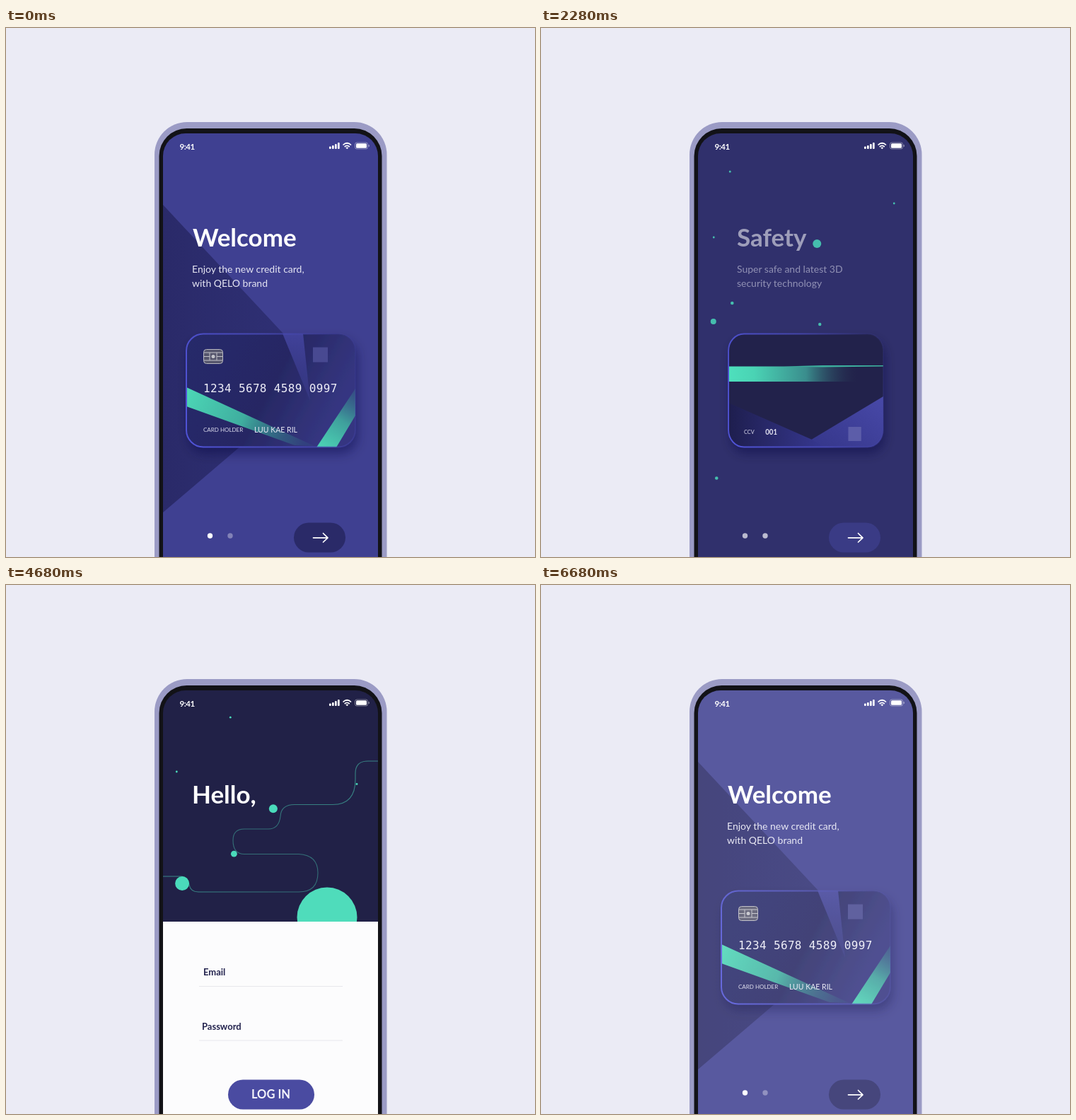
Animation of 748x748 px, one loop 6720 ms. Source, as an HTML page:

```html
<!DOCTYPE html>
<html lang="en">
<head>
<meta charset="utf-8">
<title>Card onboarding</title>
<style>
  html, body { margin: 0; width: 100%; height: 100%; overflow: hidden; background: #ebebf5; }
  svg { display: block; width: 100vw; height: 100vh; font-family: Lato, sans-serif; }
  .title { font-size: 35px; font-weight: 700; fill: #fff; }
  .sub { font-size: 14px; fill: #e4e4f2; }
  .tiny { font-size: 8px; fill: #dcdcee; }
  .label { font-size: 13px; font-weight: 700; fill: #23234e; }
  .number { font: 16px "DejaVu Sans Mono", monospace; letter-spacing: .35px; fill: #eeeef8; }
  .wire { fill: none; stroke-width: 1.1; }
</style>
</head>
<body>
<svg viewBox="0 0 748 748">
  <defs>
    <clipPath id="screen"><rect x="222" y="149" width="304" height="700" rx="32"/></clipPath>
    <clipPath id="cardShape"><rect x="255" y="432.5" width="239" height="160" rx="24"/></clipPath>
    <filter id="shadow" x="-20%" y="-20%" width="140%" height="150%">
      <feDropShadow dx="3" dy="9" stdDeviation="8" flood-color="#11113a" flood-opacity=".42"/>
    </filter>
    <linearGradient id="shade" x1="0" x2="1">
      <stop stop-color="#2a2a69"/><stop offset="1" stop-color="#303177"/>
    </linearGradient>
    <linearGradient id="front" x1="0" x2="1" y2=".35">
      <stop stop-color="#28296a"/><stop offset=".6" stop-color="#272864"/><stop offset="1" stop-color="#353681"/>
    </linearGradient>
    <linearGradient id="wedge" x1="0" y1="0" x2="0" y2="1">
      <stop stop-color="#41429a"/><stop offset="1" stop-color="#41429a" stop-opacity=".3"/>
    </linearGradient>
    <linearGradient id="edge" x1="0" y1=".6" x2="1" y2=".4">
      <stop stop-color="#5053d6"/><stop offset=".55" stop-color="#4a4cbc" stop-opacity=".8"/>
      <stop offset="1" stop-color="#4a4cbc" stop-opacity=".12"/>
    </linearGradient>
    <linearGradient id="ribbonA" gradientUnits="userSpaceOnUse" x1="255" y1="515" x2="436" y2="590">
      <stop stop-color="#4cd6b6"/><stop offset=".45" stop-color="#3fae9f"/>
      <stop offset="1" stop-color="#2f6a83" stop-opacity=".1"/>
    </linearGradient>
    <linearGradient id="ribbonB" gradientUnits="userSpaceOnUse" x1="450" y1="593" x2="496" y2="515">
      <stop stop-color="#4bd0b3"/><stop offset=".5" stop-color="#3f9f9c"/>
      <stop offset="1" stop-color="#356688" stop-opacity=".5"/>
    </linearGradient>
    <linearGradient id="strip" gradientUnits="userSpaceOnUse" x1="255" y1="0" x2="455" y2="0">
      <stop stop-color="#4ee0bd"/><stop offset=".2" stop-color="#4ad3b4"/>
      <stop offset=".6" stop-color="#3a8d8d"/><stop offset="1" stop-color="#27304f" stop-opacity="0"/>
    </linearGradient>
    <linearGradient id="foldA" x1="0" x2="1">
      <stop stop-color="#1e1e4e"/><stop offset="1" stop-color="#383994"/>
    </linearGradient>
    <linearGradient id="foldB" x1="0" x2="1" y1="1" y2="0">
      <stop stop-color="#35368a"/><stop offset="1" stop-color="#4849a8"/>
    </linearGradient>
    <linearGradient id="wireTop" gradientUnits="userSpaceOnUse" x1="495" y1="285" x2="440" y2="390">
      <stop stop-color="#4bd3b6" stop-opacity=".15"/><stop offset="1" stop-color="#4bd3b6" stop-opacity=".9"/>
    </linearGradient>
    <linearGradient id="wireLow" gradientUnits="userSpaceOnUse" x1="232" y1="702" x2="290" y2="620">
      <stop stop-color="#4bd3b6" stop-opacity=".1"/><stop offset="1" stop-color="#4bd3b6" stop-opacity=".9"/>
    </linearGradient>
    <linearGradient id="wireR" gradientUnits="userSpaceOnUse" x1="372" y1="0" x2="425" y2="0">
      <stop stop-color="#4bd3b6" stop-opacity="0"/><stop offset="1" stop-color="#4bd3b6" stop-opacity=".8"/>
    </linearGradient>
    <linearGradient id="wireL" gradientUnits="userSpaceOnUse" x1="260" y1="0" x2="416" y2="0">
      <stop stop-color="#4bd3b6" stop-opacity=".95"/><stop offset="1" stop-color="#4bd3b6" stop-opacity="0"/>
    </linearGradient>
  </defs>

  <rect width="748" height="748" fill="#ebebf5"/>
  <rect x="210" y="133" width="328.5" height="700" rx="46" fill="#9b9bc5"/>
  <rect x="216.5" y="142" width="315" height="700" rx="39" fill="#121217"/>

  <g clip-path="url(#screen)">
    <rect id="bg" x="222" y="149" width="304" height="600"/>
    <path id="beam" d="M222 250L448 492L222 685Z" fill="url(#shade)"/>

    <g id="wires2">
      <path id="top2" class="wire" pathLength="1" stroke="url(#wireTop)" d="M408 433V412Q408 405 415 405H428Q435 405 435 398V358Q435 351 442 351H461Q468 351 468 344V294Q468 287 475 287H495"/>
      <path id="low2" class="wire" pathLength="1" stroke="url(#wireLow)" d="M313 592V612Q313 619.500 306 619.500H296Q289 619.500 289 627V635Q289 642 282 642H259Q251 642 251 650V692Q251 699 244 699H232"/>
    </g>
    <path id="line3" class="wire" pathLength="1" stroke="#4bc9b0" d="M526 249H512Q494 249 494 266V275Q494 310.500 462 310.500H408Q389 310.500 388 327Q386 345 371 345H337Q321 345 321 361Q321 380.500 337 380.500H414Q441 382 441 407Q441 434 414 434H272Q261 434 259 424Q257 412 247 412H222"/>
    <g id="ends3">
      <path class="wire" stroke="url(#wireR)" d="M526 249H512Q494 249 494 266V275Q494 310.500 462 310.500H408Q389 310.500 388 327Q386 345 371 345"/>
      <path class="wire" stroke="url(#wireL)" d="M414 434H272Q261 434 259 424Q257 412 247 412H222"/>
    </g>
    <circle id="sun" cx="454" r="42.500" fill="#4fdcbb"/>
    <g id="dots" fill="#4adbbb"></g>

    <g id="text1">
      <text class="title" x="264" y="309">Welcome</text>
      <text class="sub" x="263" y="346">Enjoy the new credit card,</text>
      <text class="sub" x="263" y="366">with QELO brand</text>
    </g>
    <g id="text2">
      <text class="title" x="263" y="309">Safety</text>
      <text class="sub" x="263" y="346">Super safe and latest 3D</text>
      <text class="sub" x="263" y="366">security technology</text>
    </g>
    <g id="text3"><text class="title" x="263" y="309">Hello,</text></g>

    <g id="cardFront">
      <rect x="255" y="432.500" width="239" height="160" rx="24" fill="url(#front)" filter="url(#shadow)"/>
      <g clip-path="url(#cardShape)">
        <path d="M391 432H420L430 527Z" fill="url(#wedge)"/>
        <path d="M255 508L436 591L408 590L255 535Z" fill="url(#ribbonA)"/>
        <path d="M494 510L439 593H467L494 548Z" fill="url(#ribbonB)"/>
      </g>
      <rect x="255" y="432.500" width="239" height="160" rx="24" fill="none" stroke="url(#edge)" stroke-width="2"/>
      <rect x="279.500" y="454.500" width="27" height="20" rx="4" fill="#55556c" stroke="#b9b9c2"/>
      <path d="M280 459H306M280 464.500H288M298 464.500H306M280 470H306M288 459V470M298 459V470" stroke="#c3c3ca" fill="none"/>
      <circle cx="293" cy="464.500" r="2.500" fill="#c3c3ca"/>
      <rect x="434" y="451.500" width="21" height="21" fill="#484991"/>
      <text class="number" x="279" y="515">1234 5678 4589 0997</text>
      <text class="tiny" x="279" y="571">CARD HOLDER</text>
      <text x="351" y="572" font-size="10.500" fill="#e8e8f4">LUU KAE RIL</text>
    </g>

    <g id="cardBack">
      <rect x="255" y="432.500" width="239" height="160" rx="24" fill="#24244b" filter="url(#shadow)"/>
      <g clip-path="url(#cardShape)">
        <path d="M255 530L384 582L410 593H255Z" fill="url(#foldA)"/>
        <path d="M494 521L383 582L405 593H494Z" fill="url(#foldB)"/>
        <rect x="255" y="478.500" width="200" height="21.500" fill="url(#strip)"/>
        <path d="M340 478.500L400 477L494 477V478.500L400 479.500Z" fill="#3cae9d"/>
      </g>
      <rect x="255" y="432.500" width="239" height="160" rx="24" fill="none" stroke="url(#edge)" stroke-width="2"/>
      <text class="tiny" x="279" y="574">CCV</text>
      <text x="312" y="575.500" font-size="10.500" font-weight="700" fill="#e6e6f3">001</text>
      <rect x="440" y="564" width="20" height="20" fill="#5c5da9"/>
    </g>

    <rect id="panel" x="222" width="304" height="620" fill="#fcfcfd"/>
    <g id="form">
      <text class="label" x="279" y="552">Email</text>
      <text class="label" x="277" y="629">Password</text>
      <path d="M273 567.500H476M273 644H476" stroke="#e7e7ec"/>
    </g>

    <g id="pager" fill="#fff">
      <circle id="page1" cx="288.500" cy="718" r="3.700"/>
      <circle id="page2" cx="317" cy="718" r="3.700"/>
    </g>
    <g id="action">
      <rect id="pill" y="699.500" height="42" rx="21"/>
      <path id="arrow" d="M434.500 720.800H455M448.500 714.500L455 720.800L448.500 727" fill="none" stroke="#fff" stroke-width="1.700" stroke-linecap="round" stroke-linejoin="round"/>
      <text id="login" x="374.500" y="725.500" text-anchor="middle" font-size="16.500" font-weight="700" fill="#f4f4fb">LOG IN</text>
    </g>
    <g id="tap">
      <circle r="24" fill="#1c1c45" opacity=".12"/>
      <circle r="20.500" fill="#b4b0b6" fill-opacity=".52" stroke="#e6e4ea" stroke-opacity=".75" stroke-width="1.300"/>
    </g>
    <rect id="veil" x="222" y="149" width="304" height="600" fill="#fcfcfd"/>

    <g fill="#fff">
      <text x="245.500" y="172" font-size="11.500" font-weight="700" letter-spacing="-.400">9:41</text>
      <rect x="457" y="167.500" width="2.700" height="3.500" rx="1"/>
      <rect x="461" y="166" width="2.700" height="5" rx="1"/>
      <rect x="465" y="164" width="2.700" height="7" rx="1"/>
      <rect x="469" y="162" width="2.700" height="9" rx="1"/>
      <path d="M476.500 165.500Q482.300 160 488 165.500M478.700 168Q482.300 164.800 485.800 168" fill="none" stroke="#fff" stroke-width="1.700"/>
      <path d="M480.300 169.300Q482.300 167.800 484.200 169.300L482.300 171.300Z"/>
      <rect x="493.500" y="162" width="18" height="9" rx="2.500" fill="none" stroke="#fff" stroke-opacity=".4"/>
      <rect x="495" y="163.300" width="15" height="6.400" rx="1.500"/>
      <rect x="512.600" y="165" width="1.200" height="3" rx=".600" opacity=".5"/>
    </g>
  </g>
</svg>
<script>
const LOOP = 6720, RESET = 6420;
const el = {};
document.querySelectorAll('svg [id]').forEach(n => el[n.id] = n);

const lin = p => p;
const out = p => 1 - (1 - p) ** 3;
const inn = p => p * p;
const both = p => p < .5 ? 4 * p ** 3 : 1 - (2 - 2 * p) ** 3 / 2;
const prog = (t, a, b, ease = lin) => ease(Math.min(1, Math.max(0, (t - a) / (b - a))));
const mix = (a, b, p) => a + (b - a) * p;
const rgb = (a, b, p) => `rgb(${a.map((v, i) => Math.round(mix(v, b[i], p)))})`;
const set = (n, attrs) => { for (const k in attrs) n.setAttribute(k, attrs[k]); };
const fade = (n, o) => set(n, { opacity: o, visibility: o > 0 ? 'visible' : 'hidden' });
const draw = (n, p) => set(n, { 'stroke-dasharray': `${p} 2`, visibility: p > 0 ? 'visible' : 'hidden' });

// Safety x, y, r; Hello x, y, r; drift before settling dx, dy
const dots = [
  [262, 203, 1.5, 318.5, 188, 1.4, -1.5, -1],
  [494, 248, 1.4, 496, 281.5, 1.4, 0, 0],
  [239, 296, 1.4, 242.5, 264, 1.4, -1.5, 0],
  [385, 305, 6, 383.5, 319, 6, -7, -3.5],
  [265, 389, 2.3, 324, 381, 4.4, -2, -1],
  [238.5, 415, 4, 249.5, 422, 10, -.5, 0],
  [389, 419, 2.2, 454, 470, 0, 0, 0],
  [243, 636.5, 2.3, 243, 700, 0, 0, 0]
].map(d => {
  const node = document.createElementNS('http://www.w3.org/2000/svg', 'circle');
  el.dots.append(node);
  return { node, d };
});

const taps = [[660, 1400, 443.5], [3400, 4040, 443.5], [5300, 6060, 374.5]];

function swapText(n, t, start, end) {
  const a = start ? prog(t, start, start + 360, out) : 1;
  const b = end ? prog(t, end, end + 200) : 0;
  fade(n, a * (1 - b));
  set(n, { transform: `translate(${30 * (1 - a) - 30 * b} 0)` });
}

function flip(n, s) {
  set(n, {
    transform: `translate(374.5 0) scale(${Math.max(s, .001)} 1) translate(-374.5 0)`,
    visibility: s > .01 ? 'visible' : 'hidden'
  });
}

function render(now) {
  const t = now >= RESET ? 0 : now;
  const dark = prog(t, 2040, 2520, both);
  const hello = prog(t, 4020, 4640, both);

  set(el.bg, { fill: rgb([63, 64, 145], [33, 33, 71], dark) });
  const beam = prog(t, 1440, 1980, inn);
  set(el.beam, { transform: `translate(${-230 * beam} 0)` });

  swapText(el.text1, t, 0, 2000);
  swapText(el.text2, t, 2200, 4020);
  swapText(el.text3, t, 4240, 0);

  flip(el.cardFront, Math.cos(prog(t, 1440, 2000, inn) * Math.PI / 2));
  flip(el.cardBack, Math.sin(prog(t, 2080, 2640, out) * Math.PI / 2));
  const leave = prog(t, 4020, 4400, both);
  fade(el.cardBack, t > 2080 ? 1 - leave : 0);
  if (leave > 0) set(el.cardBack, { transform: `translate(0 ${60 * leave})` });

  fade(el.wires2, 1 - prog(t, 4020, 4220));
  draw(el.top2, prog(t, 2440, 2940) * 1.01);
  draw(el.low2, prog(t, 2340, 2800) * 1.01);

  draw(el.line3, prog(t, 4120, 4660, both) * 1.01);
  const settle = prog(t, 4660, 4960, out);
  set(el.line3, { opacity: mix(.55, .1, settle) });
  fade(el.ends3, settle);

  const enter = prog(t, 2030, 2600, out);
  fade(el.dots, prog(t, 2030, 2330));
  for (const { node, d } of dots) {
    const near = 1 - settle;
    set(node, {
      cx: mix(d[0], d[3] + d[6] * near, hello) + 30 * (1 - enter),
      cy: mix(d[1], d[4] + d[7] * near, hello),
      r: mix(d[2], d[5], hello)
    });
  }

  const fill = prog(t, 5980, 6400, both);
  const panelY = mix(mix(750, 476, hello), 148, fill);
  set(el.sun, { cy: panelY - 6, visibility: hello > 0 ? 'visible' : 'hidden' });
  set(el.panel, { y: panelY });
  fade(el.form, prog(t, 4260, 4640) * (1 - prog(t, 5980, 6200)));
  set(el.form, { transform: `translate(0 ${60 * (1 - hello)})` });

  fade(el.pager, 1 - prog(t, 4020, 4200));
  set(el.page1, { opacity: mix(1, .35, dark) });
  set(el.page2, { opacity: mix(.35, 1, dark) });

  fade(el.action, 1 - prog(t, 6080, 6360));
  set(el.pill, {
    x: mix(407, 314, hello),
    width: mix(73, 122, hello),
    fill: rgb([42, 42, 104], [74, 75, 161], dark)
  });
  fade(el.arrow, 1 - prog(t, 4020, 4240));
  fade(el.login, prog(t, 4340, 4640));

  const tap = taps.find(([a, b]) => t >= a && t < b);
  fade(el.tap, 0);
  if (tap) {
    const [a, b, x] = tap;
    const press = prog(t, a, a + 320, out);
    fade(el.tap, press * (1 - prog(t, b - 140, b)));
    set(el.tap, { transform: `translate(${x} 720) scale(${mix(1.35, 1, press) - .08 * prog(t, b - 220, b)})` });
  }

  fade(el.veil, now >= RESET ? 1 - prog(now, RESET, LOOP) : 0);
}

function tick() {
  render(performance.now() % LOOP);
  requestAnimationFrame(tick);
}
tick();
</script>
</body>
</html>
```
